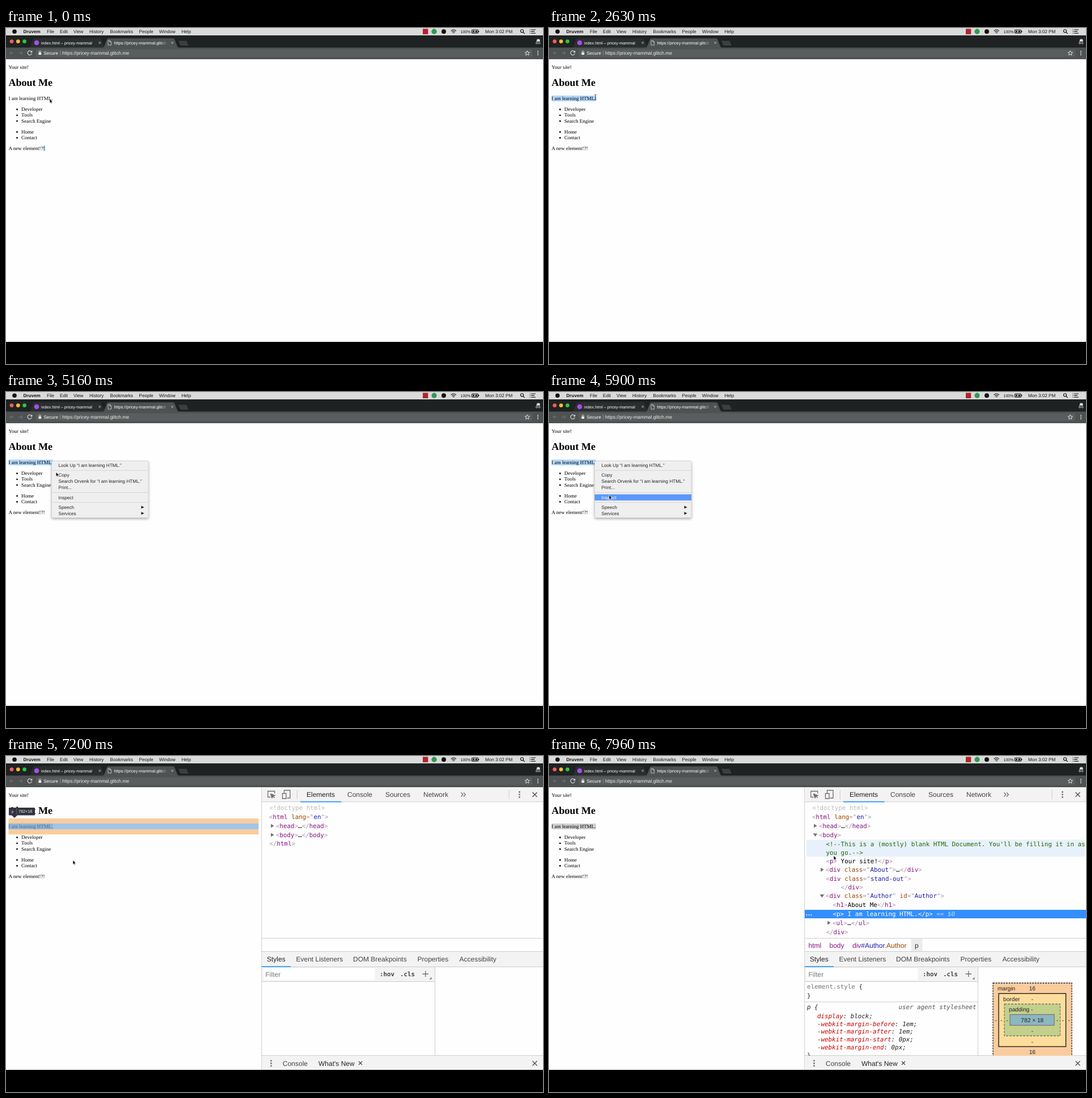
These frames come from a looping animation (947x592 px, 8000 ms). An HTML page:

```html
<!DOCTYPE html>
<html lang="en">
<head>
<meta charset="utf-8">
<title>Inspecting an element</title>
<style>
html, body { margin: 0; width: 100%; height: 100%; overflow: hidden; background: #000; }
svg { display: block; width: 947px; height: 592px; }
text { white-space: pre; text-rendering: geometricPrecision; }
.ui { font-family: "Liberation Sans", Arial, sans-serif; }
.page { font: 9.02px "Liberation Serif", Times, serif; }
.code { font: 10.85px "DejaVu Sans Mono", Menlo, monospace; }
.b { font-weight: bold; }
.i { font-style: italic; }
.mid { text-anchor: middle; }
.k { fill: #a894a6; }
.t { fill: #881280; }
.n { fill: #994500; }
.v { fill: #1a1aa6; }
.c { fill: #226800; }
.g { fill: #bbb; }
.red { fill: #c80000; }
.picked text, .picked tspan { fill: #fff; }
.picked .dim { fill: #b9d9ff; font-style: italic; }
.line { fill: none; stroke: #ccc; }
.icon { fill: none; stroke: #6e6e6e; stroke-width: 1.3; }

/* One loop is 8 s, so 1% is 80 ms. */
.step, .move { animation: 8s linear infinite; }
.step { animation-timing-function: step-end; opacity: 0; }
#bang { animation-name: bang; }
#sel { animation: drag 8s linear infinite, blur 8s step-end infinite; }
#beamShow { animation-name: beam-show; }
#beam { animation-name: beam; }
#arrowShow { animation-name: arrow-show; }
#arrow { animation-name: arrow; }
#menu { animation-name: menu; }
#row0 { animation-name: row0; }
#row1 { animation-name: row1; }
#row2 { animation-name: row2; }
#row3 { animation-name: row3; }
#row4 { animation-name: row4; }
#panel { animation-name: panel; }
#tools { animation-name: tools; }
#short { animation-name: short; }
#full { animation-name: full; }
#markP { animation-name: mark-p; }
#markBody, #hoverBody { animation-name: mark-body; }
#hoverNote { animation-name: hover-note; }

@keyframes bang { 0% { opacity: 1 } 21.25%, 100% { opacity: 0 } }
@keyframes drag { 0%, 21.25% { width: 0 } 31.25% { width: 74px } 32.5%, 100% { width: 78.4px } }
@keyframes blur { 0% { fill: #b3d7fe } 85.4%, 100% { fill: #d0d0d0 } }
@keyframes beam-show { 0% { opacity: 0 } .75% { opacity: 1 } 57.6%, 100% { opacity: 0 } }
@keyframes beam {
  0%, .75% { transform: translate(75px, 128px) }
  6.25%, 8.24% { transform: translate(46px, 126px) }
  8.25%, 11.25% { transform: translate(46.5px, 122.5px) }
  18.25%, 21.25% { transform: translate(3.5px, 124px) }
  31.25% { transform: translate(78.5px, 121.5px) }
  32.5%, 55.74% { transform: translate(82px, 121.8px) }
  55.75%, 100% { transform: translate(81.7px, 122.8px) }
}
@keyframes arrow-show { 0% { opacity: 1 } .75% { opacity: 0 } 57.6%, 100% { opacity: 1 } }
@keyframes arrow {
  0%, .75% { transform: translate(77px, 124.6px) }
  .76%, 62% { transform: translate(80px, 122.5px) }
  70%, 83.75% { transform: translate(106px, 181.5px) }
  90% { transform: translate(117px, 183.5px) }
  93.75% { transform: translate(380px, 152px) }
  95% { transform: translate(482px, 141px) }
  96.25% { transform: translate(500px, 161.5px) }
  98% { transform: translate(502px, 173px) }
  99.5%, 100% { transform: translate(502px, 175.5px) }
}
@keyframes menu { 0%, 56.6% { opacity: 0 } 56.61%, 75.75% { opacity: 1 } 80%, 100% { opacity: 0 } }
@keyframes row0 { 0% { opacity: 0 } 62.25% { opacity: 1 } 63.8%, 100% { opacity: 0 } }
@keyframes row1 { 0% { opacity: 0 } 64.6% { opacity: 1 } 66%, 100% { opacity: 0 } }
@keyframes row2 { 0% { opacity: 0 } 66% { opacity: 1 } 67.5%, 100% { opacity: 0 } }
@keyframes row3 { 0% { opacity: 0 } 67.5% { opacity: 1 } 69%, 100% { opacity: 0 } }
@keyframes row4 { 0% { opacity: 0 } 69.8% { opacity: 1 } 72.5% { opacity: 0 } 73.75%, 100% { opacity: 1 } }
@keyframes panel { 0% { opacity: 0 } 83.75%, 100% { opacity: 1 } }
@keyframes tools { 0% { opacity: 0 } 86%, 100% { opacity: 1 } }
@keyframes short { 0% { opacity: 0 } 88% { opacity: 1 } 91.5%, 100% { opacity: 0 } }
@keyframes full { 0% { opacity: 0 } 91.5%, 100% { opacity: 1 } }
@keyframes mark-p { 0% { opacity: 0 } 85.4% { opacity: 1 } 93.7%, 100% { opacity: 0 } }
@keyframes mark-body { 0% { opacity: 0 } 95% { opacity: 1 } 97.6%, 100% { opacity: 0 } }
@keyframes hover-note { 0% { opacity: 0 } 97.6%, 100% { opacity: 1 } }
</style>
</head>
<body>
<svg viewBox="0 0 947 592">
  <defs>
    <clipPath id="styleClip"><rect x="451" y="398" width="496" height="130"/></clipPath>
    <linearGradient id="fade"><stop offset="0" stop-color="#fff"/><stop offset=".9" stop-color="#fff"/><stop offset="1" stop-color="#fff" stop-opacity=".2"/></linearGradient>
    <filter id="shadow" x="-10%" y="-10%" width="120%" height="125%"><feDropShadow dx="0" dy="2" stdDeviation="2.2" flood-opacity=".32"/></filter>
  </defs>

  <!-- Menu bar -->
  <g class="ui" font-size="8.1" fill="#111">
    <rect width="947" height="13" fill="#dadada"/>
    <circle cx="15" cy="6.3" r="3.8"/>
    <text class="b" x="30.5" y="9">Druvem</text>
    <g id="menuBar"></g>
    <rect x="735" y="1.5" width="9.3" height="9.5" fill="#b3232a"/>
    <circle cx="755" cy="6.2" r="4.6" fill="#2f9a52"/>
    <circle cx="772" cy="6.2" r="4"/>
    <g fill="none" stroke="#111" stroke-width="1.1">
      <path d="M784.5 5.2q4.7-4.4 9.4 0M786.2 7.1q3-2.8 6 0M787.9 8.8q1.3-1 2.6 0"/>
      <rect x="821.5" y="3.3" width="11" height="5.6" rx="1"/>
      <circle cx="910" cy="5.3" r="2.6"/><path d="M912 7.3l2.6 2.7"/>
      <path d="M923.5 3h1.2M923.5 6.1h1.2M923.5 9.2h1.2M926 3h8M926 6.1h6M926 9.2h8"/>
    </g>
    <path d="M823 4.7h3.4l-1 2.8h-2.4zM828 4.7h3v2.8h-4z"/><rect x="833.2" y="5" width="1.2" height="2.3"/>
    <text x="801.5" y="8.7" font-size="7">100%</text>
    <text x="845" y="9">Mon 3:02 PM</text>
  </g>

  <!-- Browser frame -->
  <g class="ui" fill="#fff">
    <rect y="13" width="947" height="22" fill="#1f2223"/>
    <circle cx="10" cy="23.6" r="3.4" fill="#fc5b57"/><circle cx="21.3" cy="23.6" r="3.4" fill="#fdbc2e"/><circle cx="32.6" cy="23.6" r="3.4" fill="#29c941"/>
    <path d="M42 35l6-15q.8-1.8 2.4-1.8h115.2q1.6 0 2.4 1.8l6 15z" fill="#2b2e2f"/>
    <path d="M304 22.5h13.5q1 0 1.4 1l3 7.5h-13q-1.2 0-1.7-1z" fill="#3c3e3f"/>
    <rect y="34.5" width="947" height="20.5" fill="#4f5253"/>
    <path d="M170 35q2 0 3-2.5l5-12.5q.8-1.8 2.4-1.8h114.5q1.6 0 2.4 1.8l5 12.5q1 2.5 3 2.5z" fill="#4f5253"/>
    <circle cx="54" cy="26" r="4.3" fill="#a94df0"/>
    <text x="62" y="28.5" font-size="7.2">index.html – pricey-mammal</text>
    <text x="190.5" y="28.5" font-size="7.4" fill="url(#fade)">https://pricey-mammal.glitch</text>
    <path d="M163.5 24.2l3.6 3.6m0-3.6l-3.6 3.6M291.5 24.2l3.6 3.6m0-3.6l-3.6 3.6M180 22h3.2l2.3 2.3v5.9H180zM183 22v2.5h2.5" fill="none" stroke="#d6d6d6" stroke-width=".8"/>
    <path d="M935 23.5h6.4M936.2 23l.6-3h4l.6 3z" fill="#ddd" stroke="#ddd" stroke-width=".8"/>
    <g fill="none" stroke="#ddd" stroke-width=".9"><circle cx="936" cy="26.5" r="1.5"/><circle cx="940.4" cy="26.5" r="1.5"/></g>
    <rect x="53" y="37.5" width="875" height="13.5" rx="2" fill="#5a5d5e"/>
    <path d="M14 44H7m3-3l-3 3 3 3M22 44h7m-3-3l3 3-3 3" fill="none" stroke="#777a7b"/>
    <path d="M45.2 42.3a3.7 3.7 0 1 0 .2 2.6M45.8 40v2.7h-2.8" fill="none" stroke="#ddd" stroke-width="1.1"/>
    <rect x="57.5" y="43.2" width="4.6" height="3.8"/><path d="M58.4 43v-1.2q0-1.4 1.4-1.4t1.4 1.4V43" fill="none" stroke="#fff" stroke-width=".8"/>
    <text x="66.5" y="47" font-size="8">Secure</text>
    <path d="M95.7 40v8" stroke="#888"/>
    <text x="99" y="47" font-size="8.4" fill="#eee">https://pricey-mammal.glitch.me</text>
    <path d="M919.3 40l1.2 2.8 3 .2-2.3 2 .7 2.9-2.6-1.6-2.6 1.6.7-2.9-2.3-2 3-.2z" fill="none" stroke="#eee" stroke-width=".9"/>
    <circle cx="938" cy="41.2" r=".9"/><circle cx="938" cy="44.2" r=".9"/><circle cx="938" cy="47.2" r=".9"/>
  </g>

  <!-- Web page -->
  <rect y="55" width="947" height="498" fill="#fefefe"/>
  <rect id="bang" class="step" x="66.2" y="207" width="3" height="10" fill="#9fcbfb"/>
  <rect id="sel" x="4.5" y="119" width="0" height="10.2"/>
  <g class="page">
    <text x="4.5" y="72">Your site!</text>
    <text class="b" x="4.5" y="102" font-size="18.04">About Me</text>
    <text x="4.5" y="127">I am learning HTML.</text>
    <g id="lists"></g>
    <text x="4.5" y="215">A new element!?!</text>
  </g>

  <g id="markP" class="step ui">
    <path d="M4.5 110h441v28.2h-441zM4.5 119v10.2h441V119z" fill="#f6b26b" fill-opacity=".66" fill-rule="evenodd"/>
    <rect x="4.5" y="119" width="441" height="10.2" fill="#6fa8dc" fill-opacity=".66"/>
    <path d="M6 91h44q1 0 1 1v11.5q0 1-1 1H20l-5 4.5-5-4.5H6q-1 0-1-1V92q0-1 1-1z" fill="#31353f"/>
    <path d="M18.5 92v11.5" stroke="#666a75" stroke-width=".7"/>
    <text class="code b" x="9.5" y="100" style="font-size:6.5px" fill="#ee78e6">p</text>
    <text x="22" y="100.2" font-size="7.2" fill="#eee">782×18</text>
  </g>
  <g id="markBody" class="step ui">
    <path d="M0 59h450v162.3H0zM4.5 63.5v153.3h441V63.5z" fill="#f6b26b" fill-opacity=".66" fill-rule="evenodd"/>
    <rect x="4.5" y="63.5" width="441" height="153.3" fill="#6fa8dc" fill-opacity=".66"/>
    <path d="M2 226.5h3.5l4.5-4.5 4.5 4.5H72q1 0 1 1V239q0 1-1 1H2q-1 0-1-1v-11.5q0-1 1-1z" fill="#31353f"/>
    <path d="M24.5 227.5V239" stroke="#666a75" stroke-width=".7"/>
    <text class="code b" x="4.5" y="235.5" style="font-size:6.5px" fill="#ee78e6">body</text>
    <text x="28" y="235.7" font-size="7.6" fill="#eee">782×271.88</text>
  </g>

  <!-- Context menu -->
  <g id="menu" class="move ui" font-size="8.12" fill="#222">
    <rect x="80.5" y="121.5" width="170.7" height="100" rx="2.5" fill="#efefef" stroke="#c4c4c4" stroke-width=".6" filter="url(#shadow)"/>
    <path d="M80.5 138.2h170.7M80.5 177.2h170.7M80.5 194.5h170.7" stroke="#d6d6d6"/>
    <path d="M238.5 200.6l5.2 2.5-5.2 2.5zM238.5 211.2l5.2 2.5-5.2 2.5z"/>
    <g id="menuRows"></g>
  </g>

  <!-- Developer tools -->
  <g id="panel" class="step">
    <rect x="450.5" y="55" width="497" height="498" fill="#fefefe"/>
    <path class="line" d="M450.7 55v498"/>
    <g id="tools" class="step ui" font-size="12" fill="#444">
      <path d="M451 55h496v25.5H451zM451 344.5h496V371H451zM451 372h305.5v25.5H451zM451 528h496v25H451z" fill="#f3f3f3"/>
      <path class="line" d="M451 80.7h496M451 321.2h496M451 344.5h496M451 371.5h496M451 397.5h305.5M756.5 372v156M451 527.7h496M513.3 60v16M887 60v16"/>
      <path d="M519 79.7h72.5v1.7H519zM451 370.2h51v1.7h-51z" fill="#2f98f6"/>
      <g id="tabs"></g>
      <rect x="454" y="374" width="196.5" height="20.5" fill="#fff"/>
      <text x="457.5" y="388.6" fill="#777">Filter</text>
      <g class="code b" fill="#444"><text x="659" y="388">:hov</text><text x="695" y="388">.cls</text></g>
      <path class="icon" d="M734.5 384h10.5M739.8 378.8v10.5"/><path d="M750.5 389.5v4h-4z" fill="#777"/>
      <g class="icon">
        <path d="M466.5 72.5h-4.7V62h12v4"/><path d="M466.5 66.5l7.5 3-3.2 1.3 3 3.2M466.5 66.5l2.6 7.5 1.7-3.2" fill="#6e6e6e"/>
        <path d="M490.5 65v-4.5h10.5V74h-5.5M487.5 66h6.5v9h-6.5z"/>
        <path d="M802.5 64.5l3.3 3.5-3.3 3.5M807 64.5l3.3 3.5-3.3 3.5"/>
      </g>
      <path d="M928.5 64l8 8m0-8l-8 8M928.5 537.5l8 8m0-8l-8 8M622 538l6 6m0-6l-6 6" stroke="#555" stroke-width="1.5"/>
      <g id="dots" fill="#6e6e6e"></g>
    </g>
    <g class="code">
      <g id="hoverBody" class="step"><rect x="454" y="131.5" width="491" height="15" rx="3" fill="#e8f1fb"/></g>
      <g id="hoverNote" class="step"><rect x="454" y="147.5" width="491" height="30" rx="3" fill="#e8f1fb"/></g>
      <g id="short" class="step"></g>
      <g id="full" class="step">
        <rect x="451" y="271" width="496" height="15" fill="#338fff"/>
        <g id="tree"></g>
        <g fill="#fff"><circle cx="454.5" cy="280" r="1"/><circle cx="458.5" cy="280" r="1"/><circle cx="462.5" cy="280" r="1"/></g>
        <g class="ui" font-size="12">
          <rect x="638.5" y="322" width="20" height="22" fill="#ececec"/>
          <text class="t" x="457.5" y="338">html</text><text class="t" x="494.5" y="338">body</text>
          <text class="t" x="535" y="338">div<tspan class="v">#Author</tspan><tspan class="n">.Author</tspan></text>
          <text x="645" y="338" fill="#333">p</text>
        </g>
        <g clip-path="url(#styleClip)" fill="#222">
          <text x="455" y="410"><tspan fill="#777">element.style</tspan> {</text>
          <text x="455" y="426">}</text>
          <path class="line" d="M451 433.2h305"/>
          <g class="i">
            <text x="455" y="446">p {</text>
            <text x="753.5" y="446" text-anchor="end" fill="#555">user agent stylesheet</text>
            <g id="rules"></g>
          </g>
          <text x="455" y="531">}</text>
          <g id="boxes" class="ui" font-size="10.2"></g>
        </g>
      </g>
    </g>
  </g>

  <g id="beamShow" class="step"><g id="beam" class="move">
    <path d="M-1.8-4.6Q0-4.6 0-3.6V3.6Q0 4.6-1.8 4.6M1.8-4.6Q0-4.6 0-3.6M1.8 4.6Q0 4.6 0 3.6M-1 1h2" fill="none" stroke="#222" stroke-width=".8"/>
  </g></g>
  <g id="arrowShow" class="step"><g id="arrow" class="move">
    <path d="M0 0v7.8l1.8-1.6 1.2 2.7 1.3-.6-1.2-2.6h2.5z" fill="#000" stroke="#fff" stroke-width=".7"/>
  </g></g>
</svg>
<script>
const put = (id, parts) => { document.getElementById(id).innerHTML = parts.join(""); };
const text = (x, y, body, attrs = "") => `<text x="${x}" y="${y}" ${attrs}>${body}</text>`;
const span = (cls, body) => `<tspan class="${cls}">${body}</tspan>`;

// Colours the tags and attributes of one line of markup.
const paint = src => src.replace(/<(\/?)(\w+)([^>]*)>/g, (_, slash, name, attrs) =>
  span("k", "&lt;" + slash + span("t", name) +
    attrs.replace(/(\w+)="([^"]*)"/g, (_, key, val) => `${span("n", key)}="${span("v", val)}"`) + "&gt;"));

const fold = (x, y, open) =>
  `<path d="${open ? `M${x - 3.8} ${y - 2.5}h7.6l-3.8 5.5z` : `M${x - 2.3} ${y - 3.6}v7.2l5.3-3.6z`}" fill="#6e6e6e"/>`;

const node = (x, mid, src, open) =>
  (open === undefined ? "" : fold(x - 6.5, mid, open)) + text(x, mid + 3.9, paint(src));

put("menuBar", [["File", 72], ["Edit", 95], ["View", 119], ["History", 147], ["Bookmarks", 183.5],
  ["People", 234.5], ["Window", 270], ["Help", 309.5]].map(([s, x]) => text(x, 9, s)));

put("lists", [["Developer", 146], ["Tools", 156.3], ["Search Engine", 166.5], ["Home", 185.7], ["Contact", 196]]
  .map(([s, y]) => `<circle cx="19.5" cy="${y - 2.5}" r="1.4"/>` + text(27, y, s)));

const quote = "“I am learning HTML.”";
put("menuRows", [["Look Up " + quote, 129], ["Copy", 146.5], ["Search Orvenk for " + quote, 157.2],
  ["Print...", 168], ["Inspect", 185.7], ["Speech", 203], ["Services", 213.7]].map(([s, y], i) =>
  text(92.5, y + 2.9, s) + (i > 4 ? "" :
    `<g id="row${i}" class="step"><rect x="80.5" y="${y - 5.4}" width="170.7" height="10.8" fill="#5b97fb"/>` +
    text(92.5, y + 2.9, s, 'fill="#fff"') + "</g>")));

put("tabs", [["Elements", 530, 72, 1], ["Console", 602, 72], ["Sources", 669, 72], ["Network", 736, 72],
  ["Styles", 460, 362, 1], ["Event Listeners", 511.5, 362], ["DOM Breakpoints", 612, 362],
  ["Properties", 725.5, 362], ["Accessibility", 799.5, 362], ["Console", 488, 546], ["What's New", 551, 546, 1]]
  .map(([s, x, y, on]) => text(x, y, s, on ? 'fill="#222"' : "")));

put("dots", [[905.5, 68], [467.5, 541.5]].flatMap(([x, y]) =>
  [-4.5, 0, 4.5].map(d => `<circle cx="${x}" cy="${y + d}" r="1.4"/>`)));

const head = [
  text(464.5, 95.4, "&lt;!doctype html&gt;", 'class="g"'),
  node(464, 107, '<html lang="en">'),
  node(476, 123, "<head>…</head>", false),
];
put("short", [...head, node(476, 139, "<body>…</body>", false), node(464.5, 154.5, "</html>")]);
put("tree", [...head,
  node(476, 139, "<body>", true),
  text(488.5, 158.7, "&lt;!--This is a (mostly) blank HTML Document. You'll be filling it in as", 'class="c"'),
  text(488.5, 173.7, "you go.--&gt;", 'class="c"'),
  node(488.5, 184.7, "<p> Your site!</p>"),
  node(488, 200.3, '<div class="About">…</div>', false),
  node(488.5, 216, '<div class="stand-out">'),
  node(514.5, 231, "</div>"),
  node(488, 246.5, '<div class="Author" id="Author">', true),
  node(500.5, 262.3, "<h1>About Me</h1>"),
  `<g class="picked">${text(500.5, 282.2, paint("<p> I am learning HTML.</p>") + span("dim", " == $0"))}</g>`,
  node(500, 294, "<ul>…</ul>", false),
  node(488.5, 309.7, "</div>"),
]);

put("rules", [["display", "block"], ["-webkit-margin-before", "1em"], ["-webkit-margin-after", "1em"],
  ["-webkit-margin-start", "0px"], ["-webkit-margin-end", "0px"]]
  .map(([key, val], i) => text(473, 461.7 + i * 13.85, `${span("red", key)}: ${val};`)));

// Nested box model, from the margin inwards.
const box = (x, y, w, h, fill, stroke, dash = "") =>
  `<rect x="${x}" y="${y}" width="${w}" height="${h}" fill="${fill}" stroke="${stroke}" stroke-width="1.3" stroke-dasharray="${dash}"/>`;
const label = (x, y, s, cls = "") => text(x, y, s, `class="${cls}"`);
put("boxes", [
  box(783, 400, 139, 131, "#f9cc9d", "#222", "3 1.6"),
  box(793, 418.5, 118.5, 93.5, "#fddd9b", "#111"),
  box(803, 437, 98.5, 56, "#c3d08b", "#777", "4 2"),
  box(813, 455.5, 78, 19, "#8cb6c0", "#777"),
  label(791, 413, "margin"), label(801, 431.5, "border"), label(811, 450, "padding -"),
  ...[["16", 413], ["-", 431.5], ["782 × 18", 468.8], ["-", 487.5], ["-", 506.5], ["16", 525]]
    .map(([s, y]) => label(852.3, y, s, "mid")),
  ...[788, 798, 808, 896.5, 906.5, 917].map(x => label(x, 468.8, "-", "mid")),
]);
</script>
</body>
</html>
```
